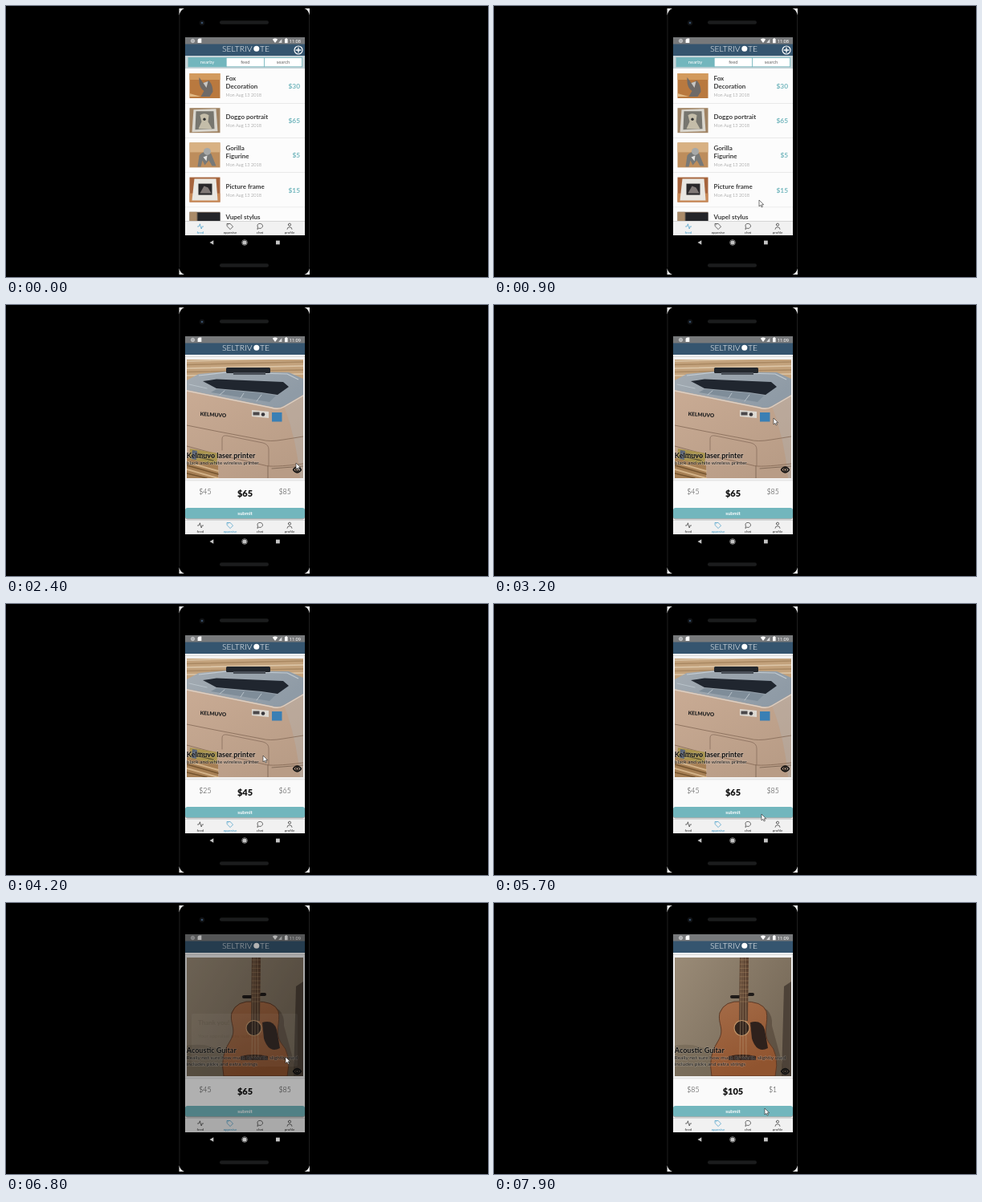
Recreate the animation shown at these times as an HTML page. Size 600 px wide and 338 px high, loop 8000 ms.

```html
<!DOCTYPE html>
<html lang="en">
<head>
<meta charset="utf-8">
<title>Appraisal app demo</title>
<style>
html, body { margin: 0; width: 100%; height: 100%; overflow: hidden; background: #000; }
svg { display: block; width: 100vw; height: 100vh; font-family: Lato, "Open Sans", sans-serif; }
.line { fill: none; stroke-linecap: round; stroke-linejoin: round; }
.halo { paint-order: stroke; stroke: #fff; stroke-opacity: .22; stroke-width: 1.2px; }
</style>
</head>
<body>
<svg id="stage" viewBox="0 0 600 338" xmlns="http://www.w3.org/2000/svg"></svg>
<script>
const LOOP = 8000;
const TEAL = '#72b6bd', NAVY = '#35556f', ACTIVE = '#419bc8';
const stage = document.getElementById('stage');

const rect = (x, y, w, h, fill, extra = '') =>
  `<rect x="${x}" y="${y}" width="${w}" height="${h}" fill="${fill}" ${extra}/>`;
const circle = (x, y, r, fill, extra = '') =>
  `<circle cx="${x}" cy="${y}" r="${r}" fill="${fill}" ${extra}/>`;
const path = (d, fill, extra = '') => `<path d="${d}" fill="${fill}" ${extra}/>`;
const line = (d, color, width = 1, extra = '') =>
  `<path class="line" d="${d}" stroke="${color}" stroke-width="${width}" ${extra}/>`;
const text = (x, y, size, label, fill = '#333', weight = 400, extra = '') =>
  `<text x="${x}" y="${y}" font-size="${size}" font-weight="${weight}" fill="${fill}" ${extra}>${label}</text>`;
const group = (id, body, extra = '') => `<g id="${id}" ${extra}>${body}</g>`;
const middle = 'text-anchor="middle"', end = 'text-anchor="end"';

function gradient(id, from, to, x2, y2) {
  return `<linearGradient id="${id}" x2="${x2}" y2="${y2}"><stop stop-color="${from}"/>` +
    `<stop offset="1" stop-color="${to}"/></linearGradient>`;
}

const defs = `<defs>
  ${gradient('front', '#c9ab94', '#b89c86', .7, 1)}
  ${gradient('lid', '#a3abb2', '#8f9ba6', 1, .4)}
  ${gradient('wall', '#9a8b77', '#756857', 1, .6)}
  ${gradient('wood', '#a56c48', '#90542f', .4, 1)}
  <clipPath id="screen">${rect(223, 39, 149, 247, '#000')}</clipPath>
  <clipPath id="listArea">${rect(223, 78, 149, 190, '#000')}</clipPath>
  <clipPath id="photoArea">${rect(225, 68, 145, 148, '#000')}</clipPath>
</defs>`;

function phone() {
  return path('M215.5 3H222Q217 5 215.5 12ZM378 3H371.5Q376.5 5 378 12ZM215.5 335V327Q217 333 222 335ZM378 335V327Q376.5 333 371.5 335Z', '#e4e4e4') +
    line('M216 12V326M377.5 12V326', '#2c2c2c', .7) +
    [18.3, 321.3].map(y => rect(266, y, 61, 4.4, '#1b1c1d', 'rx="2.2"')).join('') +
    circle(244, 21, 3.2, '#101214') +
    circle(244, 21, 1.3, '#38506b') +
    path('M253.5 295L258.3 292.2V297.8Z', '#c4c4c4') +
    circle(297, 295, 2.6, '#c4c4c4') +
    circle(297, 295, 3.4, 'none', 'stroke="#c4c4c4" stroke-width=".6"') +
    rect(336, 292.6, 4.8, 4.8, '#c4c4c4');
}

function topBars() {
  return rect(223, 39, 149, 9, '#77797b') +
    circle(232.5, 43.5, 2.2, '#b0b2b4', 'stroke="#ddd" stroke-width=".6"') +
    path('M239.5 41L241 40.5H243.3V46H238.6V42Z', '#fff') +
    path('M331.8 41.7Q335 39.2 338.2 41.7L335 46Z', '#fff') +
    path('M339.2 46H343.4V41Z', '#d8dadb') +
    path('M347 41H348V40.3H349.6V41H350.6V46.2H347Z', '#fff') +
    text(352.7, 45.8, 5.8, '11:08', '#fff', 400, 'id="clock" style="font-family:Roboto,sans-serif"') +
    rect(223, 47.5, 149, 15, NAVY) +
    text(269, 56.6, 10.4, 'SELTRIV', '#fff', 300) +
    circle(311.8, 53.3, 3.5, '#fff') +
    text(316, 56.6, 10.4, 'TE', '#fff', 300);
}

// Feed thumbnails are drawn in a 38 x 31 box.
const thumbs = [
  rect(0, 0, 38, 31, '#b9793f') + rect(0, 0, 38, 8, '#d29a5d') +
    path('M12 5L17 12L24 9Q29 14 29 23L25 29H14L18 22Q11 18 12 5Z', '#6f6a67') +
    path('M17 12L23 10L21 18Z', '#c9c7c4') + path('M0 25L14 29H0Z', '#e1b985'),
  rect(0, 0, 38, 31, '#a08363') + path('M5 2L33 1L35 29L3 30Z', '#d9d6ce') +
    path('M8 4L30 4L31 26L7 27Z', '#77766f') +
    path('M13 9Q18 5 24 9L23 17L28 26H11L15 17Z', '#c4bda9') + circle(18.5, 14, 1.7, '#333'),
  rect(0, 0, 38, 31, '#bd8d5c') + rect(0, 0, 38, 12, '#d8b183') +
    path('M10 30L12 16Q19 8 27 14L33 29H28L24 22L19 28L16 22L14 30Z', '#777978') +
    circle(22, 11, 4.5, '#a7a9a8') + path('M17 18L22 16L21 23Z', '#e3e3e0'),
  rect(0, 0, 38, 31, '#a6643c') + rect(0, 20, 38, 11, '#c88a58') +
    path('M6 2H33L35 29H3Z', '#e9e7e2') + rect(11, 8, 17, 14, '#29282a') +
    path('M13 20L18 11L23 13L27 20Z', '#817a78'),
  rect(0, 0, 38, 31, '#6f6256') + rect(10, 1, 28, 30, '#242529') + rect(0, 0, 9, 31, '#aa8b69')
];
const listings = [
  [['Fox', 'Decoration'], 30], [['Doggo portrait'], 65], [['Gorilla', 'Figurine'], 5],
  [['Picture frame'], 15], [['Vupel stylus', 'tablet'], 40]
];

function listing([lines, price], i) {
  const y = 78 + i * 43.2;
  const first = lines.length > 1 ? 15.3 : 20;
  return `<g transform="translate(228.5 ${y + 6})">${thumbs[i]}</g>` +
    lines.map((label, n) => text(273.5, y + first + n * 9.8, 8, label, '#3b3b3b', 700)).join('') +
    text(273.5, y + first + lines.length * 9.8 + .2, 5.6, 'Mon Aug 13 2018', '#777', 300) +
    text(366, y + 25, 8.3, '$' + price, TEAL, 700, end) +
    rect(223, y + 43, 149, .6, '#dedede');
}

function feedPage() {
  const segment = (x, label, on) =>
    rect(x, 64.5, 47.2, 11.3, on ? TEAL : '#fff', `stroke="${TEAL}" stroke-width=".8"`) +
    text(x + 23.6, 72, 5.8, label, on ? '#fff' : '#666', 400, middle);
  return rect(223, 62, 149, 224, '#fcfcfc') + rect(223, 62, 149, 16, '#c5d3d7') +
    segment(227, 'nearby', true) + segment(274.2, 'feed') + segment(321.4, 'search') +
    circle(364, 55, 5, 'none', 'stroke="#fff" stroke-width="1.2"') +
    line('M361.2 55H366.8M364 52.2V57.8', '#fff', 1.3) +
    `<g clip-path="url(#listArea)">${listings.map(listing).join('')}</g>`;
}

function printerPhoto() {
  const slats = Array.from({ length: 5 }, (_, i) =>
    line(`M225 ${70 + i * 4.5}L370 ${66 + i * 5}`, i % 2 ? '#a98862' : '#dcc6a8', 1.6)).join('');
  return rect(225, 68, 145, 148, '#c3a27c') + slats +
    path('M225 94L240 86L274 83L352 84L370 92V114L345 128Q338 130 330 128L225 107Z', 'url(#lid)') +
    path('M240 88L274 84L350 86L364 93', 'none', 'stroke="#c3cbd1" stroke-width="1.2"') +
    rect(274, 78, 55, 7, '#23272d', 'rx="1.5"') + rect(283, 84, 40, 3, '#4a5058') +
    path('M245 95L262 92.5L345 96L352 102L338 112L318 109L262 104Z', '#20262f') +
    path('M262 105L318 110L336 113L328 121L255 109Z', '#7f8d99') +
    line('M228 99L250 104M272 107L266 112M296 110L292 116M318 112L312 120', '#b9c3ca', 1) +
    path('M225 106L330 127Q339 130 346 126L370 112V216H262L225 192Z', 'url(#front)') +
    path('M346 126L370 112V216H366Q362 168 346 126Z', '#b3b0aa', 'opacity=".45"') +
    line('M225 107L330 128Q339 131 346 127L370 113', '#ddd0c4', 1.4) +
    line('M225 150L265 158L318 168Q328 171 345 168L370 164', '#8b705d', .9) +
    line('M269 181V167Q269 162 275 163L320 172Q327 174 327 180V200', '#8f7462', .9) +
    line('M225 176L270 188L322 200Q330 203 370 198', '#8a6e5a', .9) +
    line('M326 201V216M331 204L370 201', '#77604f', .8) +
    path('M225 190L264 200V216H225Z', '#a67f54') +
    line('M225 196L264 207M225 205L264 216', '#d3b288', 2) +
    line('M225 200L264 211M225 210L250 216', '#74542f', 1.4) +
    path('M229 179L264 185L262 199L228 192Z', '#a9944e') +
    line('M232 184L259 189M231 188L258 194', '#675d37', 1.4, 'stroke-dasharray="2 1"') +
    path('M232 181L238 182L237 193L231 192Z', '#596477') +
    text(241.5, 138, 6.5, 'KELMUVO', '#222', 900, 'transform="rotate(4 242 138)"') +
    path('M306 131L327 133V141L306 139Z', '#ddd9d2') +
    rect(307.5, 133.5, 8, 4, '#4b484b') + circle(320, 136.5, 2.3, '#38363a') +
    rect(331, 134, 12.5, 11.5, '#3a7fb4');
}

function guitarPhoto() {
  const frets = Array.from({ length: 11 }, (_, i) =>
    line(`M306 ${71 + i * 5.2}H317`, '#9c7857', .5)).join('');
  return rect(225, 68, 145, 148, 'url(#wall)') +
    path('M225 178Q256 173 275 190V216H225Z', '#6d604f', 'opacity=".5"') +
    path('M361 104L370 98V216H358Z', '#4d4238') +
    path('M318 125Q348 128 346 153L360 205V216H330Z', '#483a2e', 'opacity=".5"') +
    path('M309 123Q287 121 281 137C278 151 288 157 279 172Q266 190 271 216H350Q356 188 342 174C334 161 342 150 339 135Q334 122 309 123Z',
      'url(#wood)', 'stroke="#5b3926" stroke-width="1"') +
    line('M296 117H305M316 114H322', '#1f1b19', 4) +
    path('M306 68H317L316 147H305Z', '#59402f') + frets +
    path('M319 149Q333 145 337 158L341 181Q327 188 321 169Z', '#2e211c') +
    circle(308.5, 156, 9.5, '#33251d', 'stroke="#c09266" stroke-width="1.2"') +
    path('M292 191Q309 187 326 191V196H292Z', '#352219') +
    line('M308 68L306 193M310 68V193M313 68L314 193', '#c6ad8a', .4);
}

const eye = (x, y) => line(`M${x - 5} ${y}Q${x} ${y - 7} ${x + 5} ${y}Q${x} ${y + 7} ${x - 5} ${y}Z`, '#111', 1.3) +
  circle(x, y, 1.8, 'none', 'stroke="#111" stroke-width="1.3"');
const caption = (y, title, ...details) => text(224.8, y, 9, title, '#101010', 700, 'class="halo"') +
  details.map((label, i) => text(224.8, y + 8 + i * 7.7, 6.5, label, '#161616', 400, 'class="halo"')).join('');

const prices = [25, 45, 65, 85, 105, 125];

function appraisePage() {
  return rect(223, 62, 149, 224, '#fafafa') + rect(223, 64.2, 149, .8, '#cfcfcf') +
    rect(224, 67, 147, 150, '#fff', 'stroke="#d8d8d8" stroke-width=".6"') +
    `<g clip-path="url(#photoArea)">` +
      group('printer', printerPhoto() +
        group('closedInfo', eye(362.5, 196.5)) +
        group('openInfo', caption(190.5, 'Kelmuvo laser printer', 'black and white wireless printer') + eye(362.5, 205.5))) +
      group('guitar', guitarPhoto() +
        caption(187, 'Acoustic Guitar', 'Really not sure how much its worth. slightly used', 'includes picks and extra strings') +
        eye(362.5, 210)) +
    `</g>` + rect(223, 218.5, 149, .7, '#d2d2d2') +
    prices.map(p => text(0, 0, 9, p === 125 ? '$1' : '$' + p, '#111', 300, `id="price${p}" ${middle}`)).join('') +
    rect(223, 254, 149, 13.5, '#aaa', 'rx="3"') + rect(223, 253, 149, 13.3, TEAL, 'rx="3"') +
    text(297.5, 261.8, 6.1, 'submit', '#fff', 700, middle);
}

const tabs = [
  ['feed', 242, 'M238.5 275H240.2L241.4 271.8L243.2 278L244.2 275H245.6'],
  ['appraise', 279, 'M275.4 271.5H279L282.6 275L279.2 278.6L275.4 274.9ZM276.7 272.8H276.8'],
  ['chat', 316, 'M313 278.2L313.4 276Q311.8 271.4 316.2 271.4Q320 271.8 319.4 275.3Q317.8 278.5 314.8 277.4Z'],
  ['profile', 353, 'M350 278.3Q350 275.8 353 275.8T356 278.3M351.4 272.7A1.6 1.6 0 1 1 354.6 272.7A1.6 1.6 0 1 1 351.4 272.7']
];
const tabBar = rect(223, 268, 149, 18, '#f1f1f1') + rect(223, 268, 149, .6, '#c4c4c4') +
  tabs.map(([name, x, icon]) => group('tab-' + name,
    `<path class="line" d="${icon}" stroke="currentColor" stroke-width=".7"/>` +
    text(x, 284.4, 4.5, name, 'currentColor', 400, middle))).join('');

const dialog = rect(231, 138, 132, 66, '#fff', 'rx="2"') +
  text(239, 152, 8, 'Thank you!', '#222', 700) +
  text(239, 168, 6.4, 'Your appraisal was submitted', '#555') +
  text(353, 196, 6.4, 'OK', '#278f86', 700, end);

stage.innerHTML = defs + rect(0, 0, 600, 338, '#000') + phone() +
  `<g clip-path="url(#screen)">` + topBars() + group('feed', feedPage()) + group('appraise', appraisePage()) +
  tabBar + rect(223, 39, 149, 247, '#000', 'id="dim"') + group('dialog', dialog) + `</g>` +
  group('cursor', path('M0 0V8L1.9 6.3L3.1 9L4.4 8.4L3.2 5.8H5.7Z', '#fff', 'stroke="#222" stroke-width=".6"'));

const parts = Object.fromEntries([...stage.querySelectorAll('[id]')].map(el => [el.id, el]));
const show = (id, on) => parts[id].setAttribute('display', on ? 'inline' : 'none');
const smooth = u => u * u * (3 - 2 * u);

// Each key is [time, value, ...]; values are eased between neighbours.
function track(keys, t) {
  const next = keys.findIndex(k => k[0] > t);
  if (next === 0) return keys[0].slice(1);
  if (next < 0) return keys[keys.length - 1].slice(1);
  const a = keys[next - 1], b = keys[next];
  const u = smooth((t - a[0]) / (b[0] - a[0]));
  return a.slice(1).map((v, i) => v + (b[i + 1] - v) * u);
}

const cursorKeys = [
  [300, 372, 180], [900, 330, 242], [1300, 279, 278], [1650, 279, 278], [2300, 361, 197],
  [2600, 361, 197], [3100, 348, 141], [3250, 348, 141], [3500, 285, 234], [3850, 330, 234],
  [4150, 320, 189], [4300, 320, 189], [4700, 335, 234], [5100, 288, 234], [5650, 333, 262],
  [6050, 333, 262], [6500, 348, 192], [6850, 348, 192], [7150, 335, 234], [7350, 285, 234],
  [7500, 335, 234], [7700, 290, 234], [7880, 337, 256]
];
const priceKeys = [
  [3500, 65], [3850, 45], [4700, 45], [5100, 65], [7150, 65], [7350, 85], [7500, 85], [7700, 105]
];
const dimKeys = [[6000, 0], [6200, .6], [6650, .6], [6950, 0]];
const dialogKeys = [[6000, 0], [6150, 1], [6650, 1], [6820, 0]];

function update(t) {
  const onFeed = t < 1300, secondItem = t >= 6200, infoOpen = t >= 2400;
  show('feed', onFeed);
  show('appraise', !onFeed);
  show('printer', !secondItem);
  show('guitar', secondItem);
  show('closedInfo', !infoOpen);
  show('openInfo', infoOpen);
  show('cursor', t >= 300);
  parts.clock.textContent = t < 2400 ? '11:08' : '11:09';
  for (const [name] of tabs) {
    const active = name === (onFeed ? 'feed' : 'appraise');
    parts['tab-' + name].setAttribute('color', active ? ACTIVE : '#333');
  }

  const [selected] = track(priceKeys, t);
  for (const p of prices) {
    const offset = (p - selected) / 20, focus = Math.max(0, 1 - Math.abs(offset));
    const el = parts['price' + p];
    el.setAttribute('x', 297.5 + offset * 49.6);
    el.setAttribute('y', 236.3 + focus * 3);
    el.setAttribute('font-size', 8.8 + focus * 2.2);
    el.setAttribute('font-weight', focus > .5 ? 900 : 300);
    el.setAttribute('fill', focus > .5 ? '#111' : '#333');
  }

  parts.dim.setAttribute('opacity', track(dimKeys, t)[0]);
  parts.dialog.setAttribute('opacity', track(dialogKeys, t)[0]);
  const [x, y] = track(cursorKeys, t);
  parts.cursor.setAttribute('transform', `translate(${x} ${y})`);
}

const start = performance.now();
function frame() {
  update((performance.now() - start) % LOOP);
  requestAnimationFrame(frame);
}
frame();
</script>
</body>
</html>
```
